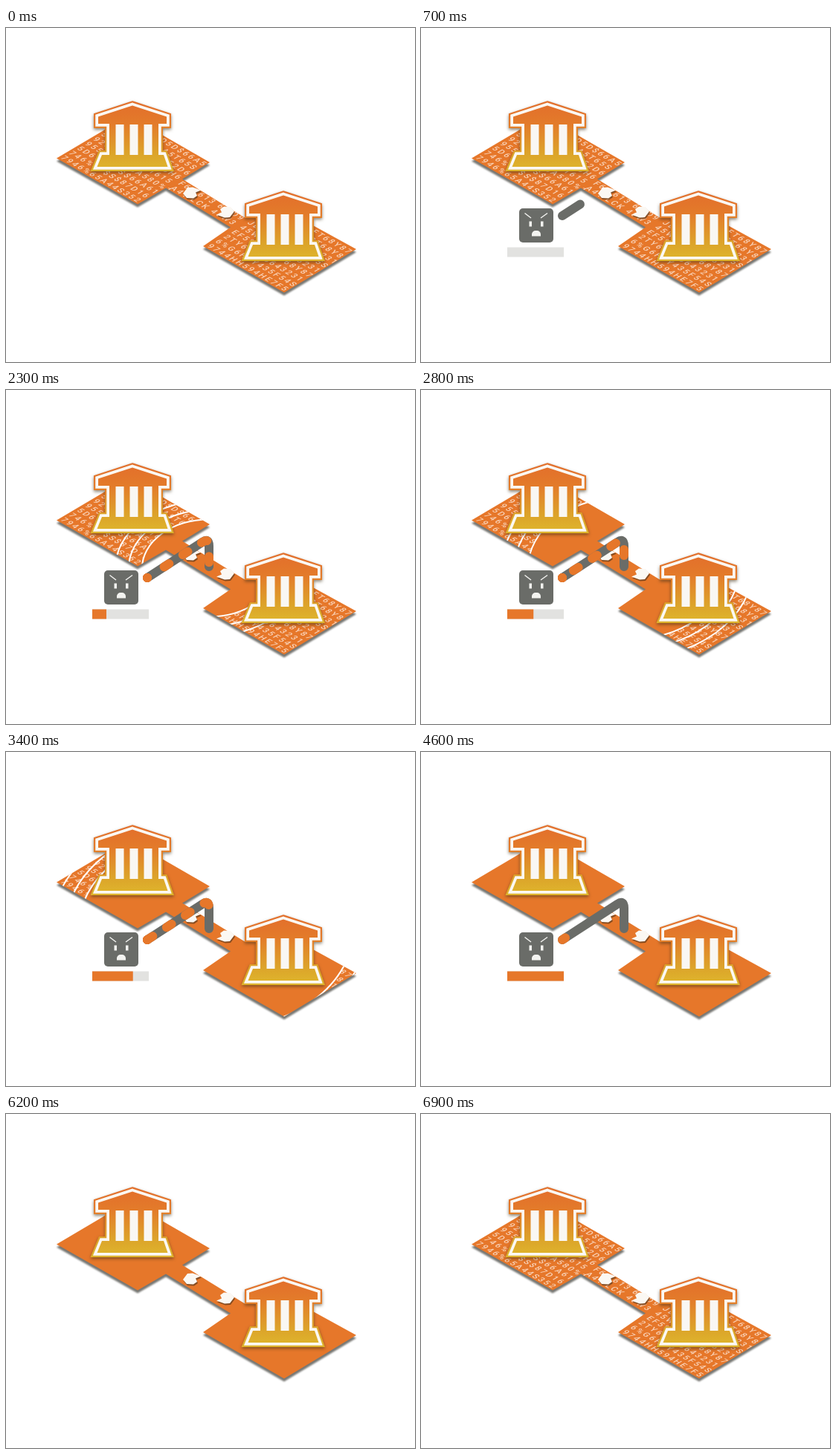
These frames come from a looping animation (550 px wide and 450 px high, 7 s). An HTML page:

```html
<!DOCTYPE html>
<html lang="en">
<head>
<meta charset="utf-8">
<title>Link intrusion</title>
<style>
  html, body { margin: 0; width: 100%; height: 100%; overflow: hidden; background: #fff; }
  svg { display: block; width: 550px; height: 450px; }
  .code { font: 500 11px Roboto, "Open Sans", sans-serif; fill: #f9d3b9; letter-spacing: 2.2px; white-space: pre; }
  #ground { filter: drop-shadow(0 4px 1.3px rgba(85, 85, 80, .8)); }
  .bank { filter: drop-shadow(0 2px 2px rgba(60, 45, 20, .6)); }
  .chevron { filter: drop-shadow(1px 2px .5px rgba(110, 65, 30, .8)); }
  #arm path { fill: none; stroke-width: 12; stroke-linecap: round; stroke-linejoin: round; }
</style>
</head>
<body>
<svg viewBox="0 0 550 450">
  <defs>
    <linearGradient id="gold" x1="0" y1="0" x2="0" y2="1">
      <stop offset="0" stop-color="#e3702b"/>
      <stop offset=".3" stop-color="#e37b2a"/>
      <stop offset=".8" stop-color="#dca52a"/>
      <stop offset="1" stop-color="#deb22c"/>
    </linearGradient>
    <path id="plates" d="M68 175.500 165 118 274 181 237 203.500 322 256 362 238 471 298 374 356.500 265 294 302 268.500 215 215.500 177 237.500Z"/>
    <clipPath id="inside"><use href="#plates"/></clipPath>
    <mask id="intact" maskUnits="userSpaceOnUse" x="0" y="0" width="550" height="450">
      <rect width="550" height="450" fill="#fff"/>
      <ellipse id="hole" cy="240" fill="#000"/>
    </mask>
    <path id="shape" d="M170 104.500 216 119.500V129H205V171H212L217.500 187H122.500L129 171H139V129H124V119.500Z"/>
    <g id="bank">
      <use href="#shape" stroke="url(#gold)" stroke-width="12"/>
      <use href="#shape" stroke="#fbf8f3" stroke-width="7.500"/>
      <use href="#shape" fill="url(#gold)"/>
      <path d="M147.500 130h11v41h-11zM166.500 130h11v41h-11zM185.500 130h11v41h-11z" fill="#f9f7f3"/>
    </g>
    <path id="chevron" d="M238 223 244 215 251 214.500 262 218.500 255 221.500 257 226 252 229.500 243 229Z"/>
  </defs>

  <g id="ground"><use href="#plates" fill="#e6772a"/></g>
  <g clip-path="url(#inside)">
    <g id="codes" class="code" mask="url(#intact)"></g>
    <g id="rings" fill="none" stroke="#fff" stroke-width="2"></g>
  </g>

  <g class="chevron" fill="#fbf8f3">
    <use href="#chevron"/>
    <use href="#chevron" transform="rotate(180 272.500 235)"/>
  </g>
  <use class="bank" href="#bank"/>
  <use class="bank" href="#bank" x="203" y="121"/>

  <g id="arm">
    <path id="tube" stroke="#6a6c68" d="M190 253 264 205Q273 199 273 210V238"/>
  </g>
  <g id="robber">
    <rect x="132" y="243" width="46" height="46" rx="5" fill="#6a6c68"/>
    <path d="M139.500 249.500 148 256M170 249.500 161 256" stroke="#f3f3f0" stroke-width="1.500"/>
    <path d="M145.500 260.500h3.500v7h-3.500zM161 260.500h3.500v7h-3.500zM149 280.500v-2.500a5 5 0 0 1 5-5h2a5 5 0 0 1 5 5v2.500z" fill="#f3f3f0"/>
    <rect x="116" y="295.500" width="76" height="13" fill="#e2e2e0"/>
    <rect id="fill" x="116" y="295.500" width="0" height="13" fill="#e6772a"/>
  </g>
</svg>
<script>
  const $ = id => document.getElementById(id);
  const clamp = (v, a = 0, b = 1) => Math.max(a, Math.min(b, v));
  const add = (parent, tag, attrs) => {
    const el = document.createElementNS("http://www.w3.org/2000/svg", tag);
    for (const k in attrs) el.setAttribute(k, attrs[k]);
    return $(parent).appendChild(el);
  };

  // Rows of code lie flat on the isometric plates, lowest row first.
  const rows = (x, y, lines) => {
    lines.forEach((line, i) => {
      add("codes", "text", {
        transform: `matrix(.866 .5 -.866 .5 ${x} ${y})`, x: 3, y: -2.5 - i * 12.5
      }).textContent = line;
    });
  };
  rows(68, 175, ["7946%65A44S352", "746%5Y$S$87D161", "5D6%65HS$66A61", "955S%8$66A580%1",
    "9255D6$87D1615", "5925S5D$66A5H6", "45D6%A44S352D6", "8F65D$66A5T65S", "74%S87D5D$66A5"]);
  rows(265, 294, ["9744HH594HE7F5", "6%G6H4Y435F54S", "2TY6T5H6643231", "EF5%G6H4Y68Y87", 
    "45W32TY6643231", "JD9F54HH635F5S", "W3EF5%G6643231", "6TY435F5GT68Y8", "5D94HE7FT68Y87"]);
  rows(215, 216, ["A41 LCK      45W3", "F6 8613 6    JD9"]);

  const tube = $("tube"), len = tube.getTotalLength();
  const rings = [0, .5, 1].map(() => add("rings", "ellipse", { cy: 240 }));
  const pulses = Array.from({ length: 6 }, () =>
    add("arm", "path", { d: tube.getAttribute("d"), stroke: "#e6772a" }));

  function span(path, from, to) {
    from = Math.max(0, from);
    to = Math.min(len, to);
    path.style.display = to > from ? "" : "none";
    path.setAttribute("stroke-dasharray", `0 ${from} ${Math.max(0, to - from)} 999`);
  }

  function oval(el, cx, r) {
    el.setAttribute("cx", cx);
    el.setAttribute("rx", r);
    el.setAttribute("ry", r * .727);
  }

  // Distance of the first pulse from the tip of the arm.
  function front(t) {
    if (t < 2300) return 19 + (t - 1500) * .101;
    return 100 + (t - 2300) * .0783;
  }

  function draw(t) {
    const drop = t < 3000
      ? 10 * Math.max(0, 5.7 - t / 100) ** 2
      : 3.33 * Math.max(0, t / 100 - 54) ** 2;
    $("robber").setAttribute("transform", `translate(0 ${drop})`);
    $("fill").setAttribute("width", 76 * clamp((t - 1715) / 2340));

    const reach = t < 3000 ? (t - 570) * .22 : len - Math.max(0, t - 4800) * .22;
    span(tube, 0, reach);
    pulses.forEach((p, i) => {
      const at = len - front(t) + i * 30;
      span(p, at - 4, at + 4);
    });

    const spread = t >= 6300 ? 0 : clamp((t - 1257) * .0863, 0, 320);
    const cx = 273 + clamp(t - 2300, 0, 1800) * .008;
    const gap = clamp((t - 1250) * .056, 0, 36);
    oval($("hole"), cx, spread);
    rings.forEach((ring, i) => oval(ring, cx, spread && spread + gap * i / 2));
    $("codes").setAttribute("opacity", t >= 6300 ? (t - 6300) / 600 : t > 4300 ? 0 : 1);
    $("rings").setAttribute("opacity", t > 4300 ? 0 : 1);
  }

  function tick(now) {
    draw(Math.floor(now % 7000 / 100) * 100);
    requestAnimationFrame(tick);
  }
  draw(0);
  requestAnimationFrame(tick);
</script>
</body>
</html>
```
